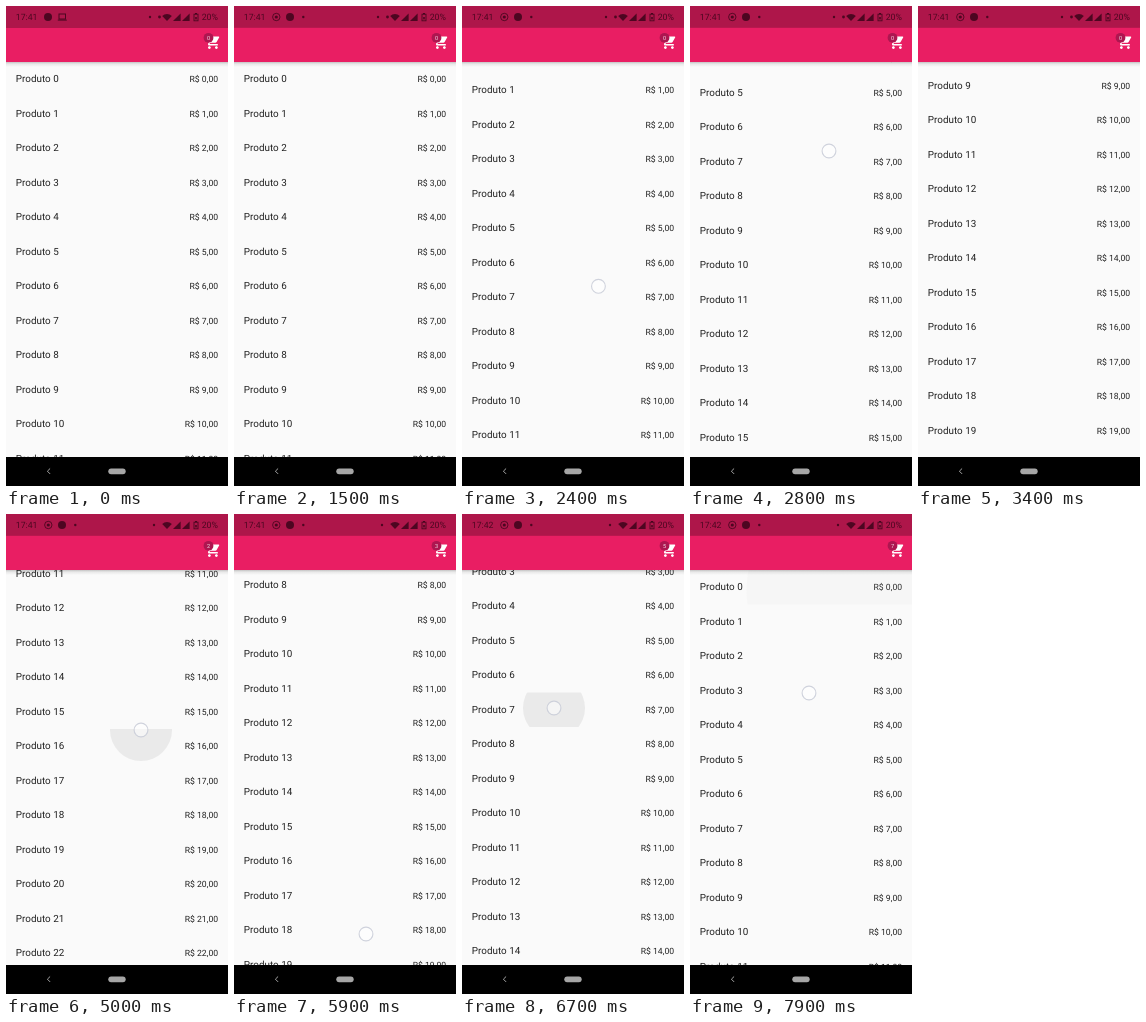
Recreate the animation shown at these times as an HTML page with a canvas. Size 222 px wide and 480 px high, loop 8000 ms.

```html
<!DOCTYPE html>
<html lang="pt-BR">
<head>
<meta charset="utf-8">
<title>Produtos</title>
<style>
html, body { margin: 0; width: 100%; height: 100%; overflow: hidden; background: #000; }
canvas { display: block; width: 222px; height: 480px; }
</style>
</head>
<body>
<canvas id="stage"></canvas>
<script>
const W = 222, H = 480, LOOP = 8000, STEP = 100;
const STATUS = 21.6, TOP = 56, ROW = 34.5, NAV = 451;
const FONT = 'Roboto, Arial, sans-serif';
const canvas = document.getElementById('stage');
const g = canvas.getContext('2d');
const ratio = window.devicePixelRatio || 1;
canvas.width = W * ratio;
canvas.height = H * ratio;

const CART = new Path2D('M7 18c-1.1 0-2 .9-2 2s.9 2 2 2 2-.9 2-2-.9-2-2-2z' +
  'M1 2v2h2l3.6 7.6-1.35 2.4C4.5 15.4 5.5 17 7 17h12v-2H7.4l-.2-.4.9-1.6h7.45' +
  'c.75 0 1.4-.4 1.75-1L20.9 5.5A1 1 0 0 0 20 4H5.2l-.94-2z' +
  'M17 18c-1.1 0-2 .9-2 2s.9 2 2 2 2-.9 2-2-.9-2-2-2z');

// Taps: release time, x, y, product row
const taps = [
  [4450, 135, 216, 16], [5000, 135, 216, 16], [5400, 135, 222, 16],
  [6340, 92, 194, 7], [6700, 92, 194, 7],
  [7450, 150, 76, 0], [7650, 150, 76, 0]
];
const PRESS = 160;

// Finger contacts: start, end of motion, x0, y0, x1, y1, linger
const drags = [
  [2330, 2800, 136, 304, 139, 145, 50],
  [4080, 4180, 135, 216, 135, 216, 0],
  [5700, 5900, 128, 305, 132, 420, 30],
  [6950, 7200, 108, 200, 114, 305, 30],
  [7780, 8000, 119, 179, 119, 179, 0]
];

const clamp = v => Math.max(0, Math.min(1, v));
const span = (t, a, b) => clamp((t - a) / (b - a));
const mix = (a, b, p) => a + (b - a) * p;

function scrollAt(t) {
  if (t < 2800) return 159 * span(t, 2330, 2800);
  if (t < 5700) return Math.min(393, 159 + 321.6 * (1 - Math.exp((2800 - t) / 1000)));
  if (t < 5900) return mix(393, 278, span(t, 5700, 5900));
  if (t < 6950) return mix(278, 119, 1 - Math.pow(1 - span(t, 5900, 6200), 1.4));
  if (t < 7200) return mix(119, 14, span(t, 6950, 7200));
  return mix(14, 0, span(t, 7200, 7300));
}

function text(s, x, y, size, color, align = 'left') {
  g.font = size + 'px ' + FONT;
  g.textRendering = 'geometricPrecision';
  g.fillStyle = color;
  g.textAlign = align;
  g.fillText(s, x, y);
}

function disc(x, y, r, color) {
  g.fillStyle = color;
  g.beginPath();
  g.arc(x, y, r, 0, 7);
  g.fill();
}

function ring(x, y, r, color, width) {
  g.strokeStyle = color;
  g.lineWidth = width;
  g.beginPath();
  g.arc(x, y, r, 0, 7);
  g.stroke();
}

function poly(points, color) {
  g.fillStyle = color;
  g.beginPath();
  points.forEach(([x, y]) => g.lineTo(x, y));
  g.fill();
}

function drawList(scroll) {
  g.fillStyle = '#fafafa';
  g.fillRect(0, TOP, W, NAV - TOP);
  for (let i = 0; i < 30; i++) {
    const y = TOP + ROW * i - scroll;
    if (y < TOP - ROW || y > NAV) continue;
    text('Produto ' + i, 9.87, y + 20.4, 9.87, '#212121');
    text(`R$ ${i},00`, 212.1, y + 20.4, 8.63, '#212121', 'right');
  }
}

function drawRipples(t, scroll) {
  for (const [up, x, y, row] of taps) {
    const age = t - up;
    if (age < -PRESS || age > 320) continue;
    const r = age < 0 ? 31 * (age + PRESS) / PRESS : 31 + age * 0.25;
    g.save();
    g.beginPath();
    g.rect(0, TOP + ROW * row - scroll, W, ROW);
    g.clip();
    disc(x, y, r, `rgba(200,200,200,${0.32 * (1 - clamp(age / 320))})`);
    g.restore();
  }
}

function drawStatus(t) {
  const ink = 'rgba(35,0,15,.7)';
  g.fillStyle = '#ae164a';
  g.fillRect(0, 0, W, STATUS);
  text(t < 6000 ? '17:41' : '17:42', 9.8, 14.2, 8.7, ink);

  // A new notification pushes the icons to the right
  const p = span(t, 0, 500);
  disc(42 + 14 * p, 11, 4, ink);
  g.globalAlpha = 1 - p;
  g.strokeStyle = ink;
  g.lineWidth = 1;
  g.strokeRect(53 + 8 * p, 8, 6.5, 5);
  g.fillStyle = ink;
  g.fillRect(51.8 + 8 * p, 13.6, 9, 1);
  g.globalAlpha = p;
  ring(42.3, 11, 3.7, ink, 0.9);
  disc(42.3, 11, 1.6, ink);
  disc(69.3, 11, 1.2, ink);
  g.globalAlpha = 1;

  if (t < 4500) {
    disc(144, 11, 1.2, ink);
    disc(153.5, 11, 1.4, ink);
  } else {
    disc(148, 11, 1.2, ink);
  }
  g.fillStyle = ink;
  g.beginPath();
  g.moveTo(161, 15);
  g.arc(161, 15, 7, -Math.PI * 0.74, -Math.PI * 0.26);
  g.fill();
  for (const x of [167, 176]) poly([[x, 15], [x + 7.6, 15], [x + 7.6, 7.4]], ink);
  g.strokeStyle = ink;
  g.lineWidth = 0.9;
  g.strokeRect(188, 8.2, 4, 6.6);
  g.fillStyle = ink;
  g.fillRect(189, 7, 2, 1.2);
  g.fillRect(189.2, 11, 1.6, 2.4);
  text('20%', 212, 14.2, 8.8, ink, 'right');
}

function drawBar(t) {
  const shade = g.createLinearGradient(0, TOP, 0, TOP + 5);
  shade.addColorStop(0, 'rgba(0,0,0,.22)');
  shade.addColorStop(0.4, 'rgba(0,0,0,.07)');
  shade.addColorStop(1, 'rgba(0,0,0,0)');
  g.fillStyle = shade;
  g.fillRect(0, TOP, W, 5);
  g.fillStyle = '#e91e63';
  g.fillRect(0, STATUS, W, TOP - STATUS);
  drawStatus(t);

  g.save();
  g.translate(198.5, 27.6);
  g.scale(0.7, 0.7);
  g.fillStyle = '#fff';
  g.fill(CART);
  g.restore();
  disc(202.5, 31.8, 4.9, '#ad1650');
  const count = taps.filter(tap => tap[0] <= t).length;
  text(count, 202.5, 33.8, 5.6, 'rgba(255,255,255,.85)', 'center');
}

function drawNav() {
  g.fillStyle = '#000';
  g.fillRect(0, NAV, W, H - NAV);
  g.strokeStyle = '#a8a8a8';
  g.lineWidth = 1;
  g.beginPath();
  g.moveTo(44.1, 462.5);
  g.lineTo(41.4, 465.2);
  g.lineTo(44.1, 467.9);
  g.stroke();
  g.fillStyle = '#a6a6a6';
  g.beginPath();
  g.roundRect(102.3, 462.4, 17.4, 5.8, 2.9);
  g.fill();
}

function finger(x, y) {
  disc(x, y, 7, 'rgba(255,255,255,.5)');
  ring(x, y, 6.9, 'rgba(196,200,212,.8)', 1.1);
}

function drawFingers(t) {
  for (const [a, b, x0, y0, x1, y1, linger] of drags) {
    if (t < a || t > b + linger) continue;
    const p = span(t, a, b);
    finger(mix(x0, x1, p), mix(y0, y1, p));
  }
  for (const [up, x, y] of taps) {
    if (t >= up - PRESS && t <= up + 40) finger(x, y);
  }
}

function draw(now) {
  const t = Math.floor((now % LOOP) / STEP) * STEP;
  const scroll = scrollAt(t);
  g.setTransform(ratio, 0, 0, ratio, 0, 0);
  drawList(scroll);
  drawRipples(t, scroll);
  drawBar(t);
  drawNav();
  drawFingers(t);
}

let start;
function tick(now) {
  start ??= now;
  draw(Math.max(0, now - start));
  requestAnimationFrame(tick);
}
draw(0);
requestAnimationFrame(tick);
</script>
</body>
</html>
```
